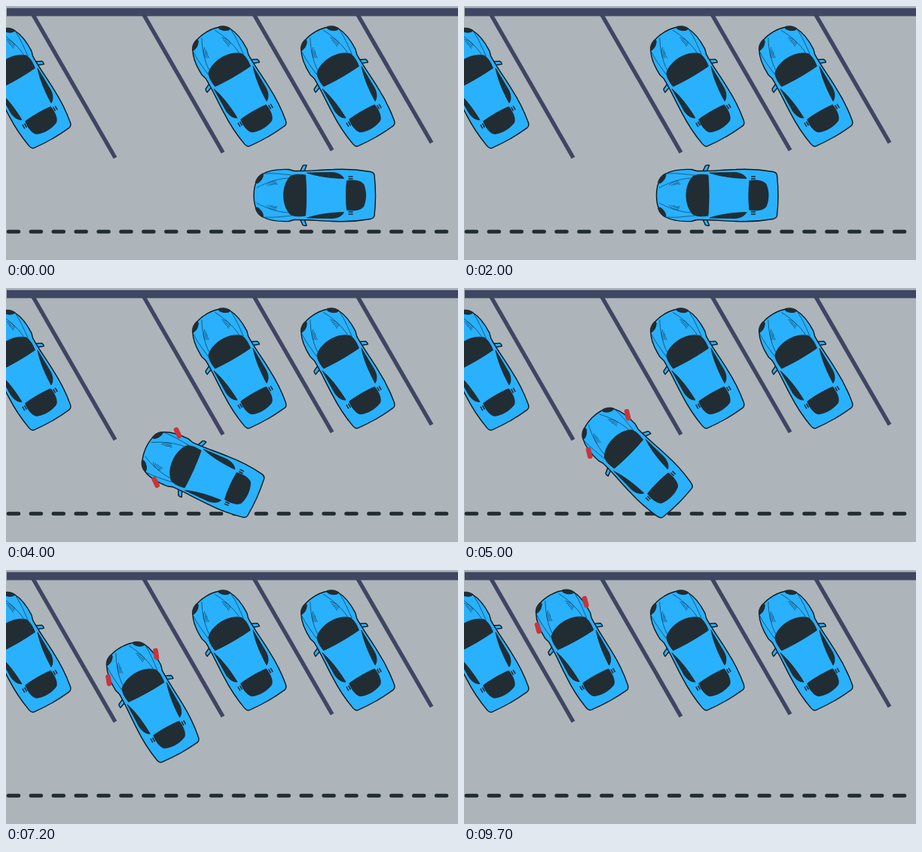
Animation, 600 px wide and 338 px high, one loop 9.8 s. Source, as an HTML page:

```html
<!DOCTYPE html>
<html lang="en">
<head>
<meta charset="utf-8">
<title>Angle parking</title>
<style>
  html, body { margin: 0; width: 100%; height: 100%; overflow: hidden; background: #adb5ba; }
  svg { display: block; width: 100vw; height: 100vh; }
  .glass { fill: #222d33; stroke: #1a252b; stroke-width: .8; stroke-linejoin: round; }
  .line { fill: none; stroke: #17405c; stroke-width: .7; }
  .vent { fill: none; stroke: #1b2a33; stroke-width: 1.6; }
  .paint { fill: #29b1fe; stroke: #10181c; stroke-width: 1.4; stroke-linejoin: round; }

  /* The car advances in held steps; --turn steers the front wheels. */
  #mover {
    transform: translate(var(--x), var(--y)) rotate(var(--angle));
    animation: park 9800ms step-end infinite;
  }
  .wheel { fill: #c9343a; opacity: var(--show); }
  .near { transform: translate(-50px, 36px) rotate(var(--turn)); }
  .far { transform: translate(-50px, -36px) rotate(var(--turn)); }

  @keyframes park {
    0%    { --x: 409.5px; --y: 252px; --angle: 0deg; --turn: 0deg; --show: 0; }
    15.3% { --x: 372px; --y: 252px; --angle: 0deg; --turn: 0deg; --show: 0; }
    20.4% { --x: 336px; --y: 252px; --angle: 0deg; --turn: 0deg; --show: 0; }
    26.5% { --x: 300px; --y: 252px; --angle: 0deg; --turn: 0deg; --show: 0; }
    29.5% { --x: 300px; --y: 252px; --angle: 0deg; --turn: 50deg; --show: 1; }
    33.6% { --x: 276px; --y: 251px; --angle: 13deg; --turn: 45deg; --show: 1; }
    38.7% { --x: 259px; --y: 246px; --angle: 24deg; --turn: 41deg; --show: 1; }
    45.9% { --x: 241px; --y: 238px; --angle: 36deg; --turn: 36deg; --show: 1; }
    51%   { --x: 227px; --y: 229.5px; --angle: 45deg; --turn: 32deg; --show: 1; }
    56.1% { --x: 214px; --y: 213px; --angle: 53deg; --turn: 30deg; --show: 1; }
    64.2% { --x: 203.5px; --y: 197px; --angle: 59deg; --turn: 29deg; --show: 1; }
    69.3% { --x: 192px; --y: 173px; --angle: 61deg; --turn: 20deg; --show: 1; }
    74.4% { --x: 178px; --y: 150px; --angle: 62deg; --turn: 12deg; --show: 1; }
    80.6% { --x: 164px; --y: 119.5px; --angle: 63deg; --turn: 6deg; --show: 1; }
    85.7%, 100% { --x: 154px; --y: 103.5px; --angle: 61deg; --turn: 14deg; --show: 1; }
  }
</style>
</head>
<body>
<svg viewBox="0 0 600 338" preserveAspectRatio="none">
  <defs>
    <!-- One side of the car, mirrored for the other -->
    <g id="side">
      <path class="paint" d="M-19 -32 L-15.5 -39.5 Q-13 -41 -10.5 -40 L-13.5 -32Z"/>
      <path class="paint" d="M-80.5 .3 C-80.5 -13 -77 -23 -69 -28.500 C-60 -33.500 -45 -35 -34 -34.500 L-27 -32.500
        C-10 -32 5 -34 25 -34.500 C45 -35.500 60 -34 74 -31.500 Q79 -30.500 79.500 -27 Q81 -13 81 .3"/>
      <path class="glass" d="M-78.500 -17 C-77 -23 -73 -27.500 -68.500 -29 C-67 -26 -70 -19 -76 -16Z"/>
      <path class="glass" d="M-10 -30 C2 -26 18 -23 39 -22.500 C36 -28 30 -30 24 -30.500Z"/>
      <path class="line" d="M-77 -10 C-64 -17 -50 -22 -35 -23 M-66 -29 C-55 -30 -42 -28 -30 -27
        M-64 -13 Q-58 -20 -51 -19 M-61 -13 Q-56 -18 -50 -17 M-58 -13.500 Q-54 -16 -49 -15 M17 -30 L20 -24"/>
      <path class="vent" d="M45 -25 h6 M45 -22 h6"/>
    </g>
    <g id="car">
      <use href="#side"/>
      <use href="#side" transform="scale(1 -1)"/>
      <path class="glass" d="M-32 -25.500 C-44 -13 -44 13 -32 25.500 C-26 28.500 -19 28 -12 27 C-10.500 10 -10.500 -10 -12 -27 C-19 -28 -26 -28.500 -32 -25.500Z"/>
      <path class="glass" d="M43 -19.500 C54 -21 62 -19 65 -15 C69 -6 69 6 65 15 C62 19 54 21 43 19.500 C41.500 8 41.500 -8 43 -19.500Z"/>
    </g>
    <rect id="tyre" x="-7.700" y="-3.300" width="15.400" height="6.600" rx="2.800"/>
  </defs>

  <rect width="600" height="338" fill="#adb5ba"/>
  <g stroke="#3f4662" fill="none">
    <path stroke-width="10.800" d="M1 8.200 H600"/>
    <path stroke-width="5.400" d="M35.500 11 L145 202 M182.500 11 L288 195 M329 11 L433 192 M466.500 11 L565 182"/>
  </g>
  <path d="M3.200 300.300 H600" stroke="#222d33" stroke-width="5" stroke-linecap="round" stroke-dasharray="13.500 16.400"/>

  <use href="#car" transform="translate(21 106.500) rotate(60)"/>
  <use href="#car" transform="translate(307 104) rotate(60)"/>
  <use href="#car" transform="translate(451 104) rotate(60)"/>

  <g id="mover">
    <use href="#car"/>
    <g class="wheel far"><use href="#tyre"/></g>
    <g class="wheel near"><use href="#tyre"/></g>
  </g>
</svg>
</body>
</html>
```
